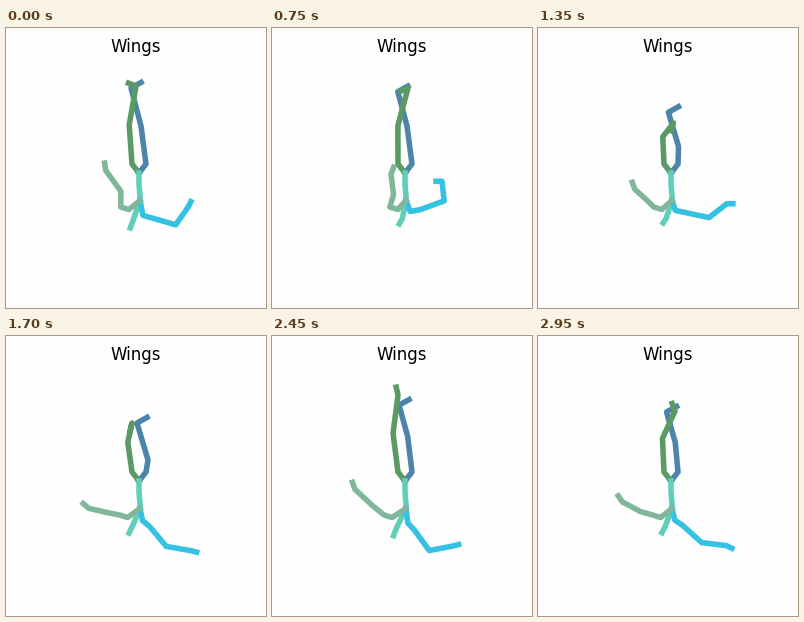
Write a matplotlib script that moves like this. It is 260 px wide and 280 px high and loops after 3000 ms.

```python
import numpy as np
import matplotlib.pyplot as plt
from matplotlib.animation import FuncAnimation

W, H, DPI = 260, 280, 100
FRAMES, INTERVAL = 60, 50

f = np.arange(FRAMES)
TIMES = np.array([0, 15, 27, 34, 42, 49, 55, 59])


def track(*values):
    """Smooth Hermite curve through one value per key time."""
    v = np.array(values, float)
    m = np.gradient(v, TIMES)
    i = np.clip(np.searchsorted(TIMES, f, side="right") - 1, 0, len(TIMES) - 2)
    h = TIMES[i + 1] - TIMES[i]
    u = (f - TIMES[i]) / h
    return ((1 + 2 * u) * (1 - u) ** 2 * v[i] + u * (1 - u) ** 2 * h * m[i]
            + u ** 2 * (3 - 2 * u) * v[i + 1] + u ** 2 * (u - 1) * h * m[i + 1])


def bone(length, degrees):
    return length * np.exp(1j * np.radians(degrees))


def mix(a, b, t):
    return a + (b - a) * t


def chain(*joints):
    """Stack joints into one row of points per frame."""
    return np.stack([j + np.zeros(FRAMES, complex) for j in joints], axis=1)


# Points are complex numbers x + iy, with y down and angles clockwise.
pelvis, chest = 133 + 145j, 134 + 172.5j

# Torso: a slow sideways sway and a quicker nod
sway = 3 * np.sin(2 * np.pi * f / 60)
nod = 197.2 + 2.7 * np.cos(2 * np.pi * f / 46)
head = 124.3 + sway + 1j * nod
neck = head + 3 + 1j * (0.7 * (197 - nod) - 6)

# Right leg folds and stretches along straight paths
fold = track(0, .11, .89, 1, .74, .3, .44, .56)
knee_r = mix(135 + 98j, 142 + 124j, fold ** 2)
ankle_r = mix(125 + 60j, 131 + 87j, fold ** .9)
toe_r = ankle_r + bone(11.5, -29)

# Left ankle leads, its knee follows
ax_l = track(130, 136, 135.5, 126, 120, 126, 130, 137)
ay_l = track(58, 60, 95, 87, 59, 59, 61, 75)
ankle_l = ax_l + 1j * ay_l
knee_l = 122.8 + .2 * (ax_l - 128) + .5 * sway + 1j * mix(97, ay_l + 39, .32)
toe_l = ankle_l + bone(8, track(-159, -204, -250, -256, -130, -103, -102, -111))

# Right arm: shoulder rises with the upper arm
upper_r = track(16, -20, 12, 50, 64, 54, 45, 42)
fore_r = track(-55, -96, -38, 10, 8, -11, 5, 7)
hand_r = track(-63, -180, 0, 14, 11, -14, 23, 26)
collar_r = 137 + .4 * sway + 1j * (nod - 12.5)
shoulder_r = 144.8 + sway + 1j * (nod - 12 + .11 * upper_r)
elbow_r = shoulder_r + bone(25.9, upper_r)
wrist_r = elbow_r + bone(24.5 + .05 * fore_r, fore_r)
tip_r = wrist_r + bone(6, hand_r)

# Left arm: seen at a slant, so its reach varies
reach = track(41.6, 33.6, 26, 31.6, 40, 39, 35, 33)
upper_l = track(-90, -73, -135, -169, -145, -141, -160, -164)
fore_l = track(-126, -97, -138, -167, -150, -137, -146, -152)
shoulder_l = 114.8 + sway + 179j
collar_l = shoulder_l + 8 + 2.5j
elbow_l = shoulder_l + bone(.38 * reach, upper_l)
wrist_l = elbow_l + bone(.62 * reach, fore_l)
tip_l = wrist_l + bone(7.3, fore_l + 28)

# Back to front
CHAINS = [
    ("#4D84AA", chain(pelvis, 140 + 136j, knee_r, ankle_r, toe_r)),
    ("#5B9965", chain(pelvis, 126 + 136j, knee_l, ankle_l, toe_l)),
    ("#61CEB9", chain(pelvis, 133 + 156j, 134 + 168j, chest, neck, head)),
    ("#34C1E2", chain(chest, collar_r, shoulder_r, elbow_r, wrist_r, tip_r)),
    ("#80B79A", chain(chest, collar_l, shoulder_l, elbow_l, wrist_l, tip_l)),
]

fig = plt.figure(figsize=(W / DPI, H / DPI), dpi=DPI, facecolor="#fefefe")
ax = fig.add_axes([0, 0, 1, 1])
ax.set(xlim=(0, W), ylim=(H, 0))
ax.axis("off")
ax.text(130, 24, "Wings", fontsize=12, family="DejaVu Sans",
        ha="center", va="baseline", color="black")

lines = [ax.plot([], [], color=color, lw=4, solid_capstyle="projecting",
                 solid_joinstyle="round")[0] for color, _ in CHAINS]


def update(frame):
    for line, (_, path) in zip(lines, CHAINS):
        line.set_data(path[frame].real, path[frame].imag)
    return lines


anim = FuncAnimation(fig, update, frames=FRAMES, interval=INTERVAL,
                     repeat=True, repeat_delay=0, blit=False)
plt.show()
```
